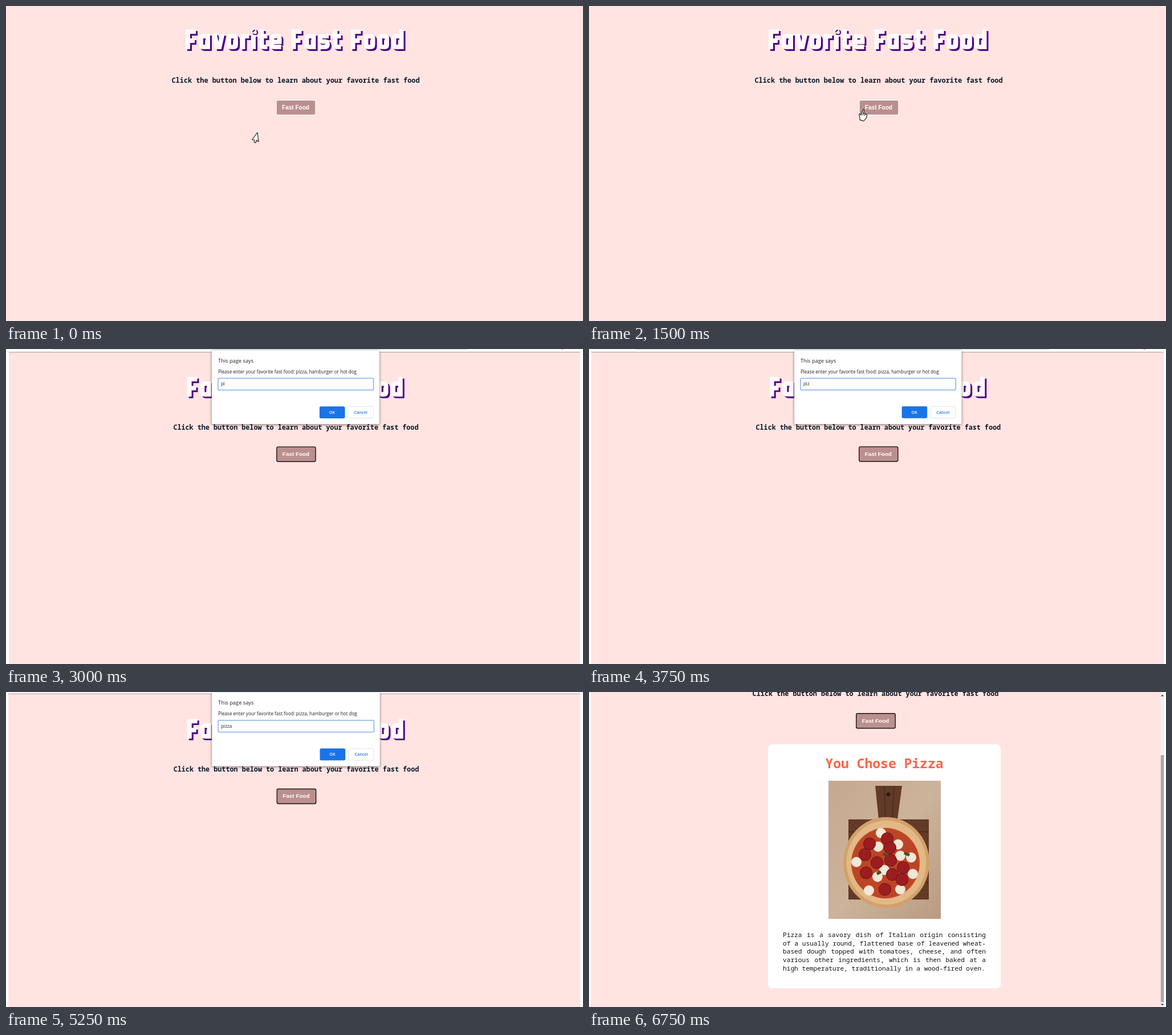
An HTML page for the animation above (7500 ms loop, 1012 by 554 pixels).

```html
<!DOCTYPE html>
<html lang="en">
<head>
<meta charset="utf-8">
<title>Favorite Fast Food</title>
<style>
  html, body { margin: 0; width: 100%; height: 100%; overflow: hidden; background: #fff; }
  svg { display: block; width: 100%; height: 100%; }
  .mono, p { font-family: "Noto Sans Mono", "DejaVu Sans Mono", monospace; }
  .middle { text-anchor: middle; }
  #button text { font: bold 10px "Liberation Sans", Arial, sans-serif; fill: #fff; }
  #dialog text { font: 8.08px "Open Sans", "Noto Sans", sans-serif; fill: #202124; }
  #dialog .heading { font-size: 9.3px; }
  #dialog .label { font-size: 7.2px; font-weight: 600; }
  #panel { filter: drop-shadow(0 1px 2px rgba(0, 0, 0, .55)); }
  p { margin: 0; font-size: 11.16px; line-height: 14.75px; text-align: justify; color: #111; }
</style>
</head>
<body>
<svg viewBox="0 0 1012 554">
  <rect id="backdrop" fill="#ffe4e1"/>
  <rect id="toolbarLine" height="1" fill="#a3a0a0"/>

  <g id="view">
    <defs><g id="title"></g></defs>
    <g fill="none" stroke-width="8" role="img" aria-label="Favorite Fast Food">
      <use href="#title" x="3" y="3" stroke="#4b0082"/>
      <use href="#title" stroke="#fffafa"/>
    </g>
    <text class="mono middle" x="508" y="135" font-size="11.9" font-weight="600" fill="#0a1626">Click the button below to learn about your favorite fast food</text>
    <g id="button">
      <rect id="buttonBox" x="474" y="165.5" width="69" height="26.2" rx="2.5" fill="#bc8f8f" stroke-width="1.4"/>
      <text class="middle" x="508" y="181.6">Fast Food</text>
    </g>

    <g id="dialog" transform="scale(1.0116) translate(-6.4 -8.6)">
      <rect x="79" y="-10" width="733" height="11.6" rx="5" fill="#dfe1e5"/>
      <circle cx="976" cy="-1" r="2" fill="#c96a78"/>
      <rect id="panel" x="361" y="2.5" width="294" height="129.7" rx="2" fill="#fff"/>
      <text class="heading" x="372" y="24.3">This page says</text>
      <text x="372" y="42.8">Please enter your favorite fast food: pizza, hamburger or hot dog</text>
      <rect x="372" y="51.7" width="272.7" height="20.6" rx="1.5" fill="#fff" stroke="#83b0ea" stroke-width="1.5"/>
      <text id="typed" x="377" y="64.5"></text>
      <rect x="550" y="101" width="44.6" height="21" rx="2.5" fill="#1a73e8"/>
      <text class="label middle" x="572" y="114" style="fill:#fff">OK</text>
      <rect x="600.2" y="101.4" width="44.2" height="20.4" rx="2.5" fill="#fff" stroke="#dadce0" stroke-width=".8"/>
      <text class="label middle" x="622.3" y="114" style="fill:#1a73e8">Cancel</text>
    </g>

    <g id="card" transform="scale(1.00756) translate(1.7 126.5)">
      <rect x="314" y="92" width="408" height="429.3" rx="7" fill="#fff"/>
      <text class="mono middle" x="518" y="134" font-size="23" font-weight="600" fill="#ff6347">You Chose Pizza</text>
      <linearGradient id="paper" x2="1" y2="1">
        <stop stop-color="#c5a88f"/><stop offset=".5" stop-color="#cdb39b"/><stop offset="1" stop-color="#b99b82"/>
      </linearGradient>
      <rect x="420" y="156" width="197" height="243" fill="url(#paper)"/>
      <path d="M455 224H508L502 165H549L541 224H596V365H455Z" fill="#623b28"/>
      <path d="M455 246H596M455 335H596M518 166L520 224M535 166L532 224" stroke="#4e2d1f" stroke-width="2"/>
      <circle cx="525" cy="180" r="3.5" fill="#2c1912"/>
      <ellipse cx="521.5" cy="300" rx="75.5" ry="80" fill="#d3a06a"/>
      <ellipse cx="521.5" cy="300" rx="70" ry="74" fill="#e2b986"/>
      <ellipse cx="520" cy="301" rx="60" ry="62" fill="#bd4526"/>
      <g id="cheese" fill="#f3e7d6"></g>
      <g id="pepperoni" fill="#9c1d20" stroke="#74151a"></g>
      <path d="M516 284l8 5M553 283l9 4M512 316l-7 4" stroke="#435127" stroke-width="5"/>
      <foreignObject x="340" y="419.8" width="356" height="80">
        <p xmlns="http://www.w3.org/1999/xhtml">Pizza is a savory dish of Italian origin consisting of a usually round, flattened base of leavened wheat-based dough topped with tomatoes, cheese, and often various other ingredients, which is then baked at a high temperature, traditionally in a wood-fired oven.</p>
      </foreignObject>
    </g>
  </g>

  <g id="scrollbar">
    <rect id="track" height="554" fill="#f1f1f1"/>
    <rect id="thumb" height="434.5" fill="#a8a8a8"/>
    <path id="arrows" d="M-3 7.5L0 4.5L3 7.5ZM-3 548.5L0 551.5L3 548.5Z" fill="#505050"/>
  </g>

  <g fill="#fff" stroke="#111" stroke-width="1.1" stroke-linejoin="round">
    <path id="arrow" d="M10 .5L12 16.5L8.4 14L7 18.5L4.2 18L5 13.7L.7 13Z"/>
    <path id="hand" d="M8 1Q10.2 .4 9.8 2.6L8 8.6L10 7.6L11.3 9L13 8.8L14.6 11L13.2 16L8.6 21.3L2.2 19.4L1.8 14L.6 9.6Q1.4 8 2.8 9.4L4.2 11Z M8 8.6L7.2 11.5M11.3 9L10.5 12"/>
  </g>
</svg>
<script>
const $ = id => document.getElementById(id);
const set = (id, attributes) => {
  for (const name in attributes) $(id).setAttribute(name, attributes[name]);
};
const show = (id, visible) => set(id, { display: visible ? "inline" : "none" });
const add = (parent, tag, attributes) => {
  const node = document.createElementNS("http://www.w3.org/2000/svg", tag);
  for (const name in attributes) node.setAttribute(name, attributes[name]);
  $(parent).append(node);
};

// Heavy display letters: advance and stroke path, with the baseline at zero.
const bowl = "H8Q4 -23 4 -19V-8Q4 -4 8 -4H";
const letters = {
  F: [23, "M4 0V-31H18M4 -15H16"],
  a: [23.5, `M16 0V-23${bowl}16`],
  v: [25.5, "M4 -27L9 -4H13L18 -27"],
  o: [24.5, `M12 -23${bowl}12Q16 -4 16 -8V-19Q16 -23 12 -23Z`],
  r: [18.5, "M4 0V-23H15"],
  i: [11.5, "M4 0V-25M3 -32.5a1 1 0 1 0 2 0a1 1 0 1 0 -2 0"],
  t: [21, "M7 -35V-8Q7 -4 11 -4H17M0 -23H17"],
  e: [25, `M4 -13H17V-19Q17 -23 13 -23${bowl}20`],
  s: [23.5, "M19 -23H8Q4 -23 4 -18Q4 -13.5 9 -13.5H12Q17 -13.5 17 -9Q17 -4 12 -4H2"],
  d: [25, `M17 0V-35M17 -23${bowl}17`],
  " ": [13, ""]
};
let penX = 315;
for (const letter of "Favorite Fast Food") {
  const [advance, d] = letters[letter];
  add("title", "path", { d, transform: `translate(${penX} 76)` });
  penX += advance;
}

const scatter = (id, r, points) => points.forEach(([cx, cy]) => add(id, "circle", { cx, cy, r }));
scatter("cheese", 9, [[512, 248], [542, 268], [469, 299], [546, 288], [506, 325], [491, 349],
  [546, 347], [568, 320], [507, 272], [565, 291], [518, 313]]);
scatter("pepperoni", 10.5, [[492, 267], [523, 258], [528, 274], [484, 286], [505, 300], [529, 296],
  [551, 309], [486, 318], [532, 321], [549, 330], [519, 347]]);

// view: x, y, scale; edge: left, right, top; scroll: x, width, thumb y
const step = 750;
const home = { view: [0, 0, 1], edge: [0, 1012, 0] };
const states = [
  { ...home, arrow: [431, 222] },
  { ...home, arrow: [459, 195] },
  { ...home, hand: [473, 181] },
  { view: [6.3, 8.5, .9885], edge: [5, 1007, 5], typed: "p" },
  { view: [6.3, 8.5, .9885], edge: [5, 1007, 5], typed: "pi" },
  { view: [5.9, 8.5, .987], edge: [4, 1008, 5], typed: "piz" },
  { view: [5.4, 8.5, .9855], edge: [4, 1007, 5], typed: "pizz" },
  { view: [5.8, 6.6, .9905], edge: [4, 1007, 2.6], typed: "pizza" },
  { view: [-1.9, -11.5, .9885], edge: [3, 997, 0], scroll: [997, 11, 21] },
  { view: [-1.7, -126.5, .9925], edge: [3, 1002, 0], scroll: [1002, 7, 111] }
];

function draw({ view, edge, typed, scroll, arrow, hand }) {
  const [x, y, scale] = view;
  const [left, right, top] = edge;
  set("view", { transform: `translate(${x} ${y}) scale(${scale})` });
  set("backdrop", { x: left, y: top, width: right - left, height: 554 - top });
  set("toolbarLine", { x: left, y: top, width: right - left });
  set("buttonBox", { stroke: arrow || hand ? "#fffafa" : "#151515" });
  show("toolbarLine", typed);
  show("dialog", typed);
  $("typed").textContent = typed || "";
  show("card", scroll);
  show("scrollbar", scroll);
  if (scroll) {
    const [barX, width, thumbY] = scroll;
    set("track", { x: barX, width });
    set("thumb", { x: barX + .8, y: thumbY, width: width - 1.6 });
    set("arrows", { transform: `translate(${barX + width / 2} 0)` });
  }
  for (const [id, position] of [["arrow", arrow], ["hand", hand]]) {
    show(id, position);
    if (position) set(id, { transform: `translate(${position})` });
  }
}

let current = -1;
function tick() {
  const index = Math.floor(performance.now() / step) % states.length;
  if (index !== current) draw(states[current = index]);
  requestAnimationFrame(tick);
}
tick();
</script>
</body>
</html>
```
